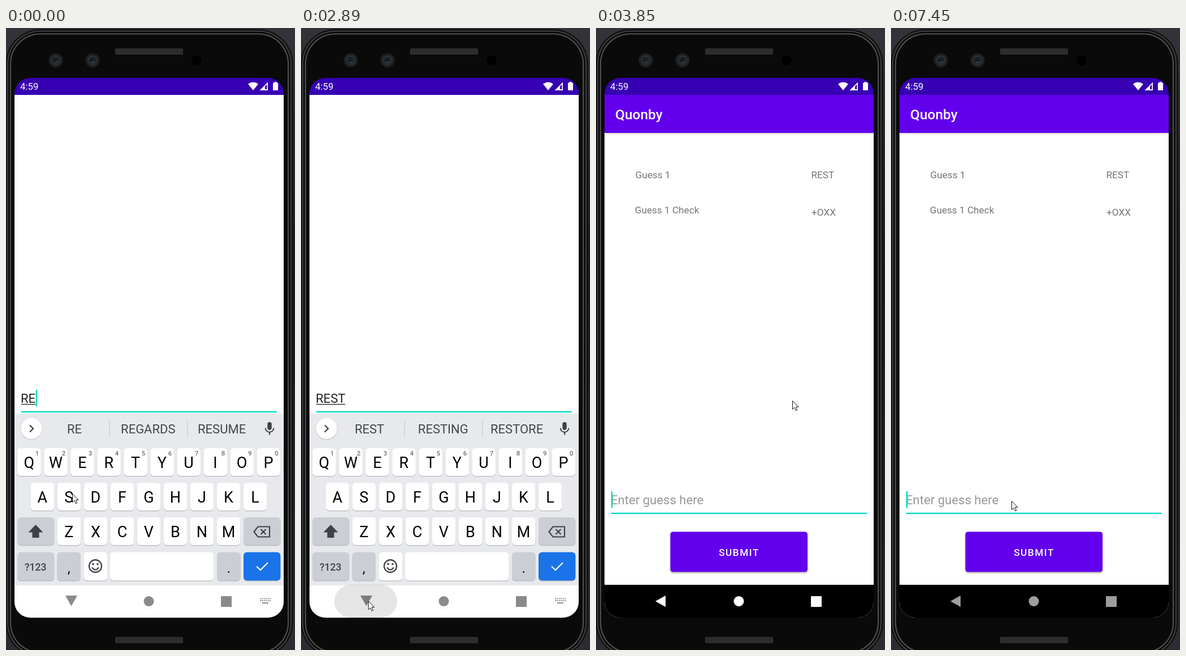
Write an HTML page with a canvas that moves like this. It is 511 px wide and 1097 px high and loops after 8000 ms.

```html
<!DOCTYPE html>
<html lang="en">
<head>
<meta charset="utf-8">
<title>Word game on a phone</title>
<style>
html, body { margin: 0; width: 100%; height: 100%; overflow: hidden; background: #0a0a0a; }
canvas { display: block; width: 511px; height: 1097px; }
</style>
</head>
<body>
<canvas id="stage"></canvas>
<script>
const W = 511, H = 1097, LOOP = 8000;
const TICK = 137.6, LEAD = 20; // the screen refreshes once per tick
const BLINK = 490;
const TEAL = '#03dac5', PURPLE = '#6200ee', INK = '#3f4244';
const BODY = 17.2, FIELD = 22.12, TITLE = 24.5; // text sizes

// Moments of the story, in ms.
const AT = { focus: -220, s: 960, t: 2200, back: 2740, close: 2960, open: 3100, submit: 3380, guess: 3520 };
const SUGGESTIONS = {
  RE: ['RE', 'REGARDS', 'RESUME'],
  RES: ['RES', 'RESUME', 'RED'],
  REST: ['REST', 'RESTING', 'RESTORE']
};
const START = { x: 117, y: 821 };
const MOVES = [
  { from: AT.s, to: 1900, x: 225, y: 783 },
  { from: 2250, to: 2760, x: 115, y: 1012 },
  { from: 2850, to: 3270, x: 265, y: 945 },
  { from: 3400, to: 3800, x: 347, y: 657 },
  { from: 3900, to: 4900, x: 213, y: 834 }
];

const dpr = window.devicePixelRatio || 1;
const clamp = v => Math.min(1, Math.max(0, v));
const lerp = (a, b, k) => a + (b - a) * k;
const smooth = k => k * k * (3 - 2 * k);

function makeLayer(canvas) {
  canvas.width = Math.round(W * dpr);
  canvas.height = Math.round(H * dpr);
  const ctx = canvas.getContext('2d');
  ctx.scale(dpr, dpr);
  return ctx;
}
const stage = makeLayer(document.getElementById('stage'));
const ghost = makeLayer(document.createElement('canvas'));
let g = stage;

function fill(color) {
  g.fillStyle = color;
  g.fill();
}
function stroke(color, width) {
  g.strokeStyle = color;
  g.lineWidth = width;
  g.stroke();
}
function rect(x, y, w, h, color) {
  g.fillStyle = color;
  g.fillRect(x, y, w, h);
}
function pathRound(x, y, w, h, r) {
  g.beginPath();
  g.roundRect(x, y, w, h, r);
}
function round(x, y, w, h, r, color) {
  pathRound(x, y, w, h, r);
  fill(color);
}
function disc(x, y, r, color) {
  g.beginPath();
  g.arc(x, y, r, 0, Math.PI * 2);
  fill(color);
}
function arc(x, y, r, from, to, color, width) {
  g.beginPath();
  g.arc(x, y, r, from, to);
  stroke(color, width);
}
function trace(points, closed) {
  g.beginPath();
  for (const [x, y] of points) g.lineTo(x, y);
  if (closed) g.closePath();
}
function poly(points, color) {
  trace(points, true);
  fill(color);
}
function line(points, color, width) {
  trace(points);
  stroke(color, width);
}
function text(s, x, y, size, color, { weight = 400, align = 'left', gap = 0 } = {}) {
  g.font = `${weight} ${size}px Roboto, sans-serif`;
  g.letterSpacing = gap + 'px';
  g.textAlign = align;
  g.fillStyle = color;
  g.fillText(s, x, y);
  return g.measureText(s).width;
}
function shadowed(color, blur, dy, draw) {
  g.save();
  g.shadowColor = color;
  g.shadowBlur = blur * dpr;
  g.shadowOffsetY = dy * dpr;
  draw();
  g.restore();
}

function grille(y) {
  round(193, y, 120, 11, 2, '#343434');
  for (let row = 0; row < 5; row++)
    for (let x = 194 + row % 2; x < 312; x += 2) rect(x, y + 1 + row * 2, 1, 1, '#181818');
}
function lens(x) {
  disc(x, 57, 12.5, '#1d2124');
  disc(x, 57, 8.5, '#2b3135');
  disc(x, 57, 6, '#1a1e21');
  arc(x, 57, 4, 0.4, 2.2, '#454d52', 1.5);
}
function drawPhone() {
  const back = g.createLinearGradient(0, 0, 0, H);
  back.addColorStop(0, '#32343a');
  back.addColorStop(0.4, '#191a1d');
  back.addColorStop(1, '#2b2d32');
  rect(0, 0, W, H, back);
  // Nested shells from the metal rim to the glass.
  ['#101010', '#3c3c3c', '#050505', '#4c4c4c', '#0a0a0a'].forEach((color, i) => {
    const inset = i * 2.4;
    round(inset - 0.5, inset + 2, 508 - inset * 2, 1108 - inset * 2, 61 - inset, color);
  });
  lens(88);
  lens(153);
  disc(337, 57, 9, '#000');
  grille(36);
  grille(1074);
}

function drawStatus() {
  rect(15, 88, 476, 30, '#3700b3');
  text('4:59', 25, 109, 16.8, '#fff');
  g.beginPath();
  g.moveTo(437, 110);
  g.lineTo(428, 98.7);
  g.quadraticCurveTo(437, 92.3, 446, 98.7);
  fill('#fff');
  poly([[448.5, 110], [463, 110], [463, 95.5]], '#fff');
  poly([[458, 108], [461.3, 108], [461.3, 99.5], [458, 103]], '#3700b3');
  round(472, 96.5, 9, 13.5, 1.2, '#fff');
  rect(474.5, 95, 4, 2, '#fff');
}

function drawHomeAndRecents(color) {
  disc(252.5, 1011, 9, color);
  round(380, 1002, 19, 19, 1, color);
}
function downTriangle(color) {
  poly([[105, 1001], [126, 1001], [115.5, 1019.5]], color);
}
function backRipple() {
  round(59, 982, 111, 58, 29, 'rgba(0,0,0,.1)');
}

function drawGuess() {
  const grey = '#757575';
  text('Guess 1', 69.5, 265, BODY, grey);
  text('REST', 380.5, 265, BODY, grey);
  text('Guess 1 Check', 68.7, 326.5, BODY, grey);
  text('+OXX', 381, 331, BODY, grey);
}
function drawField(s) {
  let end = 26.3;
  if (s.word) end = 26 + text(s.word, 26, 840, FIELD, '#212121');
  else text('Enter guess here', 26, 840, FIELD, '#999');
  if (s.composing) rect(27, 842, end - 27, 1.3, '#212121');
  if (s.caret) rect(end + 0.5, 817, 2.4, 29.5, TEAL);
  rect(26.5, 854.8, 452.5, 2.4, TEAL);
}
function drawButton(ripple) {
  const box = [131.5, 888.4, 242.5, 70.8, 4.5];
  shadowed('rgba(0,0,0,.32)', 3, 2, () => round(...box, PURPLE));
  round(...box, `rgba(255,255,255,${ripple})`);
  text('SUBMIT', 217.2, 930.7, BODY, '#fff', { weight: 500, gap: 1.53 });
}
// dy is how far the open keyboard pushes the window up.
function drawApp(s, dy) {
  rect(15, 117, 476, 923, '#fff');
  if (s.guessed) drawGuess();
  g.save();
  g.translate(0, dy);
  shadowed('rgba(0,0,0,.25)', 2, 1, () => rect(15, 117, 476, 68, PURPLE));
  text('Quonby', 34, 160.5, TITLE, '#fff', { weight: 500 });
  drawField(s);
  drawButton(s.ripple);
  g.restore();
  rect(15, 982 + dy, 476, 58 - dy, '#000');
  if (dy) return;
  poly([[105, 1011], [123, 1001], [123, 1021]], s.nav);
  drawHomeAndRecents(s.nav);
}

const PITCH = 47.02, KEY = 41.5;
function key(x, y, w, color = '#fff', h = 49) {
  round(x, y + 1.3, w, h, 6, '#b7b9be');
  round(x, y, w, h, 6, color);
}
function letterRow(letters, y) {
  const left = 252.6 - (letters.length * PITCH - PITCH + KEY) / 2;
  [...letters].forEach((c, i) => {
    const x = left + i * PITCH;
    key(x, y, KEY);
    text(c, x + 20.6, y + 35, 27, '#000', { align: 'center' });
  });
}
function drawKeyIcons() {
  poly([[52.5, 876], [65.5, 889.5], [58.5, 889.5], [58.5, 899], [46.5, 899],
    [46.5, 889.5], [39.5, 889.5]], INK);
  trace([[438.5, 888.5], [445.5, 879.5], [466, 879.5], [466, 897.5], [445.5, 897.5]], true);
  stroke(INK, 2.2);
  for (const d of [-4.5, 4.5]) line([[455 - d, 884], [455 + d, 893]], INK, 2.2);
  arc(158, 949, 11, 0, Math.PI * 2, INK, 2.3);
  for (const d of [-4, 4]) disc(158 + d, 945.5, 1.8, INK);
  arc(158, 949.5, 5.8, 0.25, Math.PI - 0.25, INK, 2.3);
  line([[443, 949.5], [449.8, 956], [463, 943]], '#fff', 2.2);
}
function drawStrip(words) {
  shadowed('rgba(0,0,0,.2)', 2, 1, () => disc(45, 706.5, 18.5, '#fff'));
  line([[42, 700.5], [48, 706.5], [42, 712.5]], INK, 2.3);
  round(462.3, 695, 7.4, 14, 3.7, INK);
  arc(466, 705.5, 7.3, 0, Math.PI, INK, 2);
  rect(465, 712.5, 2.2, 5, INK);
  words.forEach((word, i) => {
    text(word, 121 + i * 130.3, 715, 22, '#444749', { align: 'center' });
    if (i) rect(44.5 + i * 138, 692, 1, 29, '#bfc1c5');
  });
}
function drawKeyboard(words, dy) {
  const dim = '#cbced5';
  g.save();
  g.translate(0, dy);
  rect(15, 680, 476, 303, '#e8e9ed');
  drawStrip(words);
  letterRow('QWERTYUIOP', 741);
  letterRow('ASDFGHJKL', 802);
  letterRow('ZXCVBNM', 863);
  for (let i = 0; i < 10; i++)
    text((i + 1) % 10, 55 + i * PITCH, 754, 11.5, '#6a6d70', { weight: 500, align: 'center' });
  key(20.3, 863, 65, dim);
  key(420, 863, 65.3, dim);
  key(20.3, 924.5, 65, dim, 50);
  key(90.5, 924.5, KEY, dim, 50);
  key(137.5, 924.5, KEY, '#fff', 50);
  key(184, 924.5, 183.5, '#fff', 50);
  key(373, 924.5, KEY, dim, 50);
  key(420, 924.5, 65.3, '#1a73e8', 50);
  text('?123', 52.3, 956.5, 17.6, INK, { weight: 500, align: 'center' });
  text(',', 111.3, 961, 25, '#111', { align: 'center' });
  text('.', 393.8, 961, 25, '#111', { align: 'center' });
  drawKeyIcons();
  rect(15, 983, 476, 60, '#fff');
  g.restore();
}
function drawKeyboardNav() {
  const grey = '#8a8a8a';
  downTriangle(grey);
  drawHomeAndRecents(grey);
  for (let i = 0; i < 12; i++)
    rect(449 + i % 6 * 3.4, i < 6 ? 1005.5 : 1009, 2, 2, grey);
  rect(453, 1013, 11, 2, grey);
}

// The keyboard slides away while the resized window fades in over it.
function drawClosing(s) {
  rect(15, 117, 476, 923, '#fff');
  drawKeyboard([], 17);
  g = ghost;
  g.clearRect(0, 0, W, H);
  drawApp(s, -107);
  g = stage;
  g.globalAlpha = 0.26;
  g.drawImage(ghost.canvas, 0, 0, W, H);
  g.globalAlpha = 1;
  backRipple();
  downTriangle('rgba(255,255,255,.13)');
}

function drawPointer(t) {
  let { x, y } = START;
  for (const m of MOVES) {
    const k = smooth(clamp((t - m.from) / (m.to - m.from)));
    x = lerp(x, m.x, k);
    y = lerp(y, m.y, k);
  }
  g.save();
  g.translate(x + 0.5, y + 0.5);
  trace([[0, 0], [0, 15], [3.4, 11.8], [6, 17.3], [8.3, 16.2], [5.8, 10.8], [10.5, 10.8]], true);
  fill('#fff');
  stroke('#111', 1);
  g.restore();
}

function stateAt(t) {
  // Every edit or focus change restarts the blinking with the caret shown.
  const restart = Math.max(...[AT.focus, AT.s, AT.t, AT.close, AT.submit].filter(e => e <= t));
  const shade = Math.round(lerp(255, 158, clamp((t - 5250) / 1200)));
  const pressed = t - AT.submit;
  return {
    word: t < AT.s ? 'RE' : t < AT.t ? 'RES' : t < AT.guess ? 'REST' : '',
    composing: t < AT.close,
    caret: Math.floor((t - restart) / BLINK) % 2 === 0,
    guessed: t >= AT.guess,
    ripple: pressed < 0 ? 0 : 0.18 * clamp(1 - pressed / 420),
    nav: `rgb(${shade},${shade},${shade})`
  };
}

function draw(t) {
  const s = stateAt(t);
  drawPhone();
  g.save();
  pathRound(15, 88, 476, 952, 28);
  g.clip();
  if (t < AT.close) {
    drawApp(s, -179);
    drawKeyboard(SUGGESTIONS[s.word], 0);
    drawKeyboardNav();
    if (t >= AT.back) backRipple();
  } else if (t < AT.open) {
    drawClosing(s);
  } else {
    drawApp(s, 0);
  }
  drawStatus();
  g.restore();
  drawPointer(t);
}

let shown = -1;
function loop() {
  const tick = Math.floor((performance.now() % LOOP + LEAD) / TICK);
  if (tick !== shown) draw((shown = tick) * TICK);
  requestAnimationFrame(loop);
}
loop();
</script>
</body>
</html>
```
